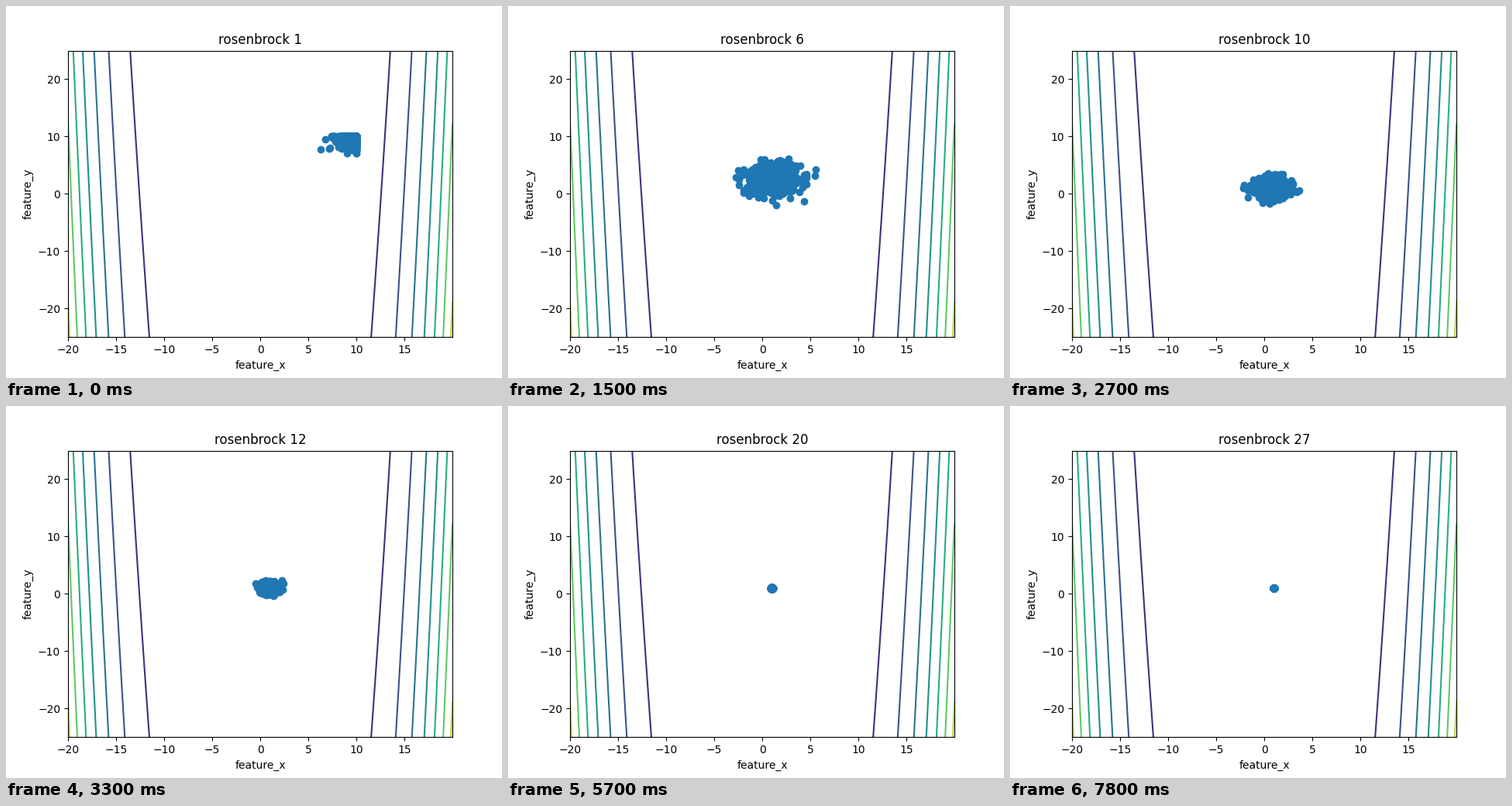
Write a matplotlib script that moves like this. It is 640x480 px and loops after 8 s.

```python
import numpy as np
import matplotlib.pyplot as plt
from matplotlib.animation import FuncAnimation

INTERVAL = 100
FRAMES = 80
FRAMES_PER_STEP = 3
STEPS = 27
SAMPLES = 500
UPPER_BOUND = 10
START, OPTIMUM = 10, 1

# The spread widens during the search, then shrinks geometrically.
SPREAD_STEPS = [1, 6, 8, 12, 20, 27]
SPREADS = [1.05, 1.4, 1.75, 0.5, 0.04, 0.008]


def rosenbrock(x, y):
    return (1 - x) ** 2 + 100 * (y - x**2) ** 2


def cloud(step):
    """Normal samples whose mean slides from START to OPTIMUM, x before y."""
    rng = np.random.default_rng(step)
    progress = np.array([np.exp(-0.78 * (step - 1)),
                         1 / (1 + np.exp(1.25 * (step - 4.8)))])
    mean = OPTIMUM + (START - OPTIMUM) * progress
    spread = np.exp(np.interp(step, SPREAD_STEPS, np.log(SPREADS)))
    samples = rng.normal(mean, spread, (SAMPLES, 2))
    return np.minimum(samples, UPPER_BOUND)


clouds = [cloud(step) for step in range(1, STEPS + 1)]

fig, ax = plt.subplots(figsize=(6.4, 4.8), dpi=100)
xs = np.linspace(-20, 19.99, 800)
ys = np.linspace(-25, 24.99, 1000)
ax.contour(xs, ys, rosenbrock(*np.meshgrid(xs, ys)))
points = ax.scatter(*clouds[0].T, color="tab:blue")
ax.set(xlim=(xs[0], xs[-1]), ylim=(ys[0], ys[-1]),
       xlabel="feature_x", ylabel="feature_y")
title = ax.set_title("rosenbrock 1")


def update(frame):
    step = frame // FRAMES_PER_STEP
    points.set_offsets(clouds[step])
    title.set_text(f"rosenbrock {step + 1}")
    return points, title


anim = FuncAnimation(fig, update, frames=FRAMES, interval=INTERVAL,
                     repeat=True, repeat_delay=0)
plt.show()
```
